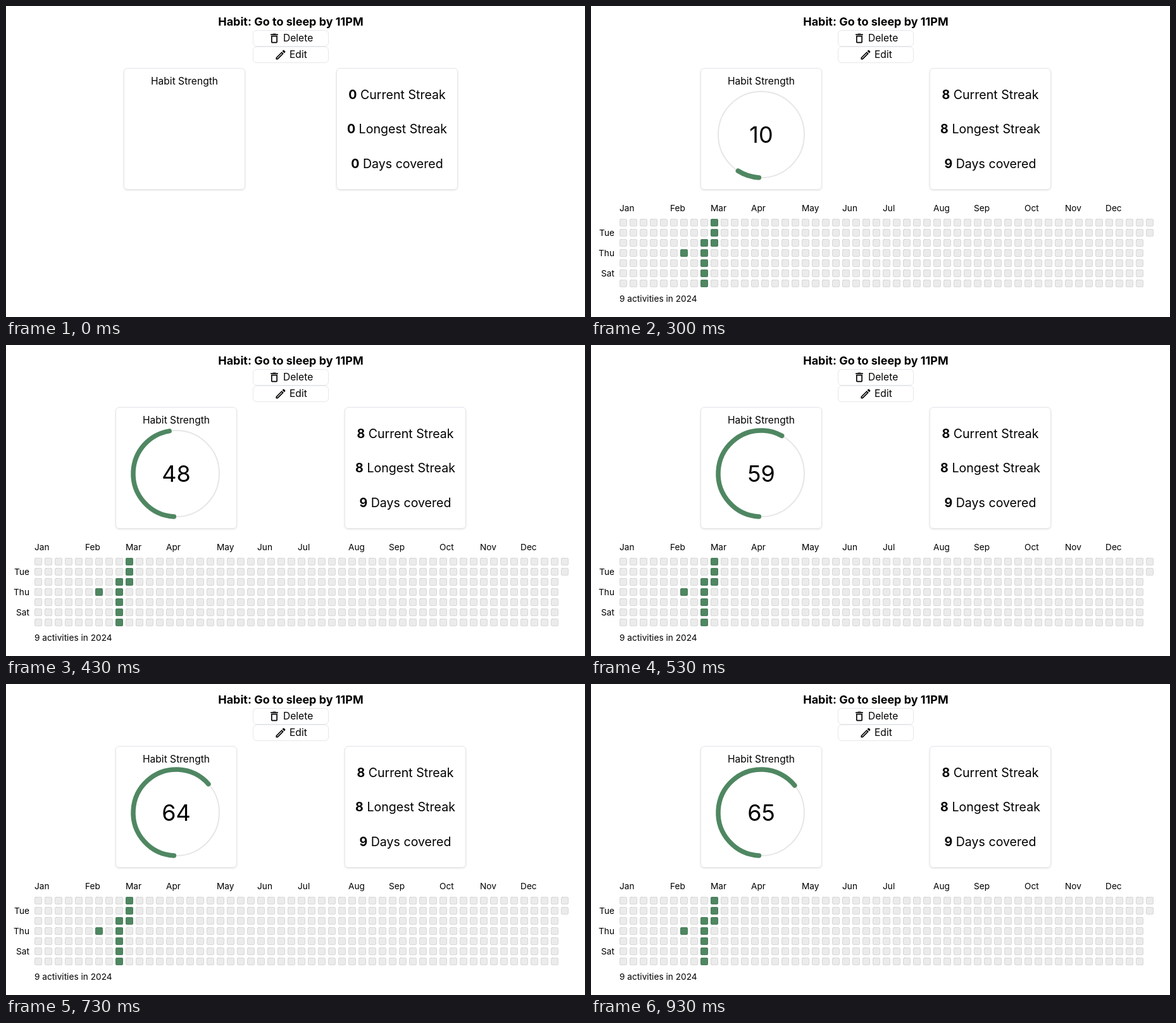
Animation, 915 px wide and 491 px high, one loop 3910 ms. Source, as an HTML page with a canvas:

```html
<!DOCTYPE html>
<html lang="en">
<head>
<meta charset="utf-8">
<title>Habit tracker</title>
<style>
  html, body { margin: 0; width: 100%; height: 100%; overflow: hidden; background: #fff; }
  canvas { display: block; width: 915px; height: 491px; }
</style>
</head>
<body>
<canvas id="stage"></canvas>
<script>
const WIDTH = 915, HEIGHT = 491, LOOP = 3910;
const RING_AT = 30, DATA_AT = 300, SETTLED_AT = 930;
const GOAL = 65;
const GREEN = '#4f8762', BORDER = '#e5e7eb', FONT = 'Inter, sans-serif';
const MONTHS = { Jan: 0, Feb: 5, Mar: 9, Apr: 13, May: 18, Jun: 22, Jul: 26, Aug: 31, Sep: 35, Oct: 40, Nov: 44, Dec: 48 };
const WEEKDAYS = { Tue: 1, Thu: 3, Sat: 5 };

const canvas = document.getElementById('stage');
const ctx = canvas.getContext('2d');
const ratio = window.devicePixelRatio || 1;
canvas.width = WIDTH * ratio;
canvas.height = HEIGHT * ratio;

function text(str, x, y, size, align = 'left', weight = 400) {
  ctx.font = `${weight} ${size}px ${FONT}`;
  ctx.textAlign = align;
  ctx.fillStyle = '#000';
  ctx.fillText(str, x, y);
}

function roundBox(x, y, w, h, r) {
  ctx.beginPath();
  ctx.roundRect(x, y, w, h, r);
}

function outline(x, y, w, h, r) {
  roundBox(x + 0.5, y + 0.5, w - 1, h - 1, r);
  ctx.strokeStyle = BORDER;
  ctx.lineWidth = 1;
  ctx.stroke();
}

function card(x) {
  ctx.save();
  ctx.shadowColor = 'rgba(0,0,0,0.13)';
  ctx.shadowBlur = 3 * ratio;
  ctx.shadowOffsetY = ratio;
  ctx.fillStyle = '#fff';
  roundBox(x, 98, 192, 192, 6);
  ctx.fill();
  ctx.restore();
  outline(x, 98, 192, 192, 5.5);
}

// Icons are drawn on a 24-unit grid and shown at 20 px.
function icon(x, y, paint) {
  ctx.save();
  ctx.translate(x, y);
  ctx.scale(20 / 24, 20 / 24);
  ctx.fillStyle = ctx.strokeStyle = '#000';
  ctx.lineWidth = 2;
  paint();
  ctx.restore();
}

function trash() {
  ctx.fillRect(5, 4, 14, 2);
  ctx.fill(new Path2D('M8.5 4l1-1h5l1 1z'));
  roundBox(7, 8, 10, 12, [0, 0, 1, 1]);
  ctx.stroke();
}

function pencil() {
  ctx.fill(new Path2D('M3 17.25V21H6.75L17.8 9.95L14.05 6.2ZM5 18.1L14.05 9L15 9.95L5.9 19H5Z'), 'evenodd');
  ctx.fill(new Path2D('M15.1 5.1L17 3.3Q17.7 2.7 18.4 3.3L20.7 5.6Q21.3 6.3 20.7 7L18.9 8.9Z'));
}

function header() {
  text('Habit: Go to sleep by 11PM', 450, 31, 18, 'center', 700);
  outline(390, 38, 120, 26, 5.5);
  outline(390, 64, 120, 26, 5.5);
  icon(414, 41, trash);
  icon(424, 67, pencil);
  text('Delete', 438, 56, 15.6);
  text('Edit', 448, 82, 15.6);
}

// Critically damped spring, sampled at 30 pictures per second.
function strength(t) {
  if (t < DATA_AT) return 0;
  if (t >= SETTLED_AT) return GOAL;
  const step = Math.floor((Math.floor(t / 10) * 10 + 3.4) * 0.03);
  const now = step / 0.03;
  const catchUp = Math.max(0, 433.3 - now) * 0.1325;
  const phase = 0.013 * (now - 229.3 - catchUp);
  return GOAL * (1 - (1 + phase) * Math.exp(-phase));
}

function ring(cx, value) {
  const cy = 203, radius = 68;
  const angle = deg => (90 + deg) * Math.PI / 180;
  ctx.beginPath();
  ctx.arc(cx, cy, radius, 0, 2 * Math.PI);
  ctx.strokeStyle = '#e6e6e6';
  ctx.lineWidth = 2;
  ctx.stroke();
  if (value > 0) {
    ctx.beginPath();
    ctx.arc(cx, cy, radius, angle(3), angle(value * 3.6 - 3));
    ctx.strokeStyle = GREEN;
    ctx.lineWidth = 7.5;
    ctx.lineCap = 'round';
    ctx.stroke();
  }
  text(Math.round(value), cx, 215.5, 36, 'center');
}

function stat(count, label, cx, y) {
  const size = 19.6, rest = ' ' + label;
  ctx.font = `700 ${size}px ${FONT}`;
  const countWidth = ctx.measureText(count).width;
  ctx.font = `400 ${size}px ${FONT}`;
  const left = cx - (countWidth + ctx.measureText(rest).width) / 2;
  text(count, left, y, size, 'left', 700);
  text(rest, left + countWidth, y, size);
}

function isDone(week, day) {
  return (week === 6 && day === 3) || (week === 8 && day >= 2) || (week === 9 && day <= 2);
}

function calendar() {
  const left = 45, top = 336, pitch = 16;
  for (const [name, week] of Object.entries(MONTHS)) text(name, left + week * pitch, 324, 13.7);
  for (const [name, day] of Object.entries(WEEKDAYS)) text(name, 37, top + day * pitch + 10.5, 13.7, 'right');
  ctx.lineWidth = 1;
  ctx.strokeStyle = 'rgba(0,0,0,0.08)';
  for (let i = 0; i < 366; i++) {
    const week = Math.floor(i / 7), day = i % 7;
    const x = left + week * pitch, y = top + day * pitch;
    ctx.fillStyle = isDone(week, day) ? GREEN : '#ebebeb';
    roundBox(x, y, 12, 12, 2);
    ctx.fill();
    roundBox(x + 0.5, y + 0.5, 11, 11, 2);
    ctx.stroke();
  }
  text('9 activities in 2024', left, 467, 13.7);
}

function draw(t) {
  const loaded = t >= DATA_AT;
  const leftCard = loaded ? 173 : 186, rightCard = loaded ? 535 : 522;
  ctx.setTransform(ratio, 0, 0, ratio, 0, 0);
  ctx.fillStyle = '#fff';
  ctx.fillRect(0, 0, WIDTH, HEIGHT);
  header();
  card(leftCard);
  card(rightCard);
  text('Habit Strength', leftCard + 96, 124, 15.6, 'center');
  if (t >= RING_AT) ring(leftCard + 96, strength(t));
  const streak = loaded ? 8 : 0, days = loaded ? 9 : 0;
  stat(streak, 'Current Streak', rightCard + 96, 147);
  stat(streak, 'Longest Streak', rightCard + 96, 201);
  stat(days, 'Days covered', rightCard + 96, 256);
  if (loaded) calendar();
}

const start = performance.now();
function tick() {
  draw((performance.now() - start) % LOOP);
  requestAnimationFrame(tick);
}
tick();
</script>
</body>
</html>
```
